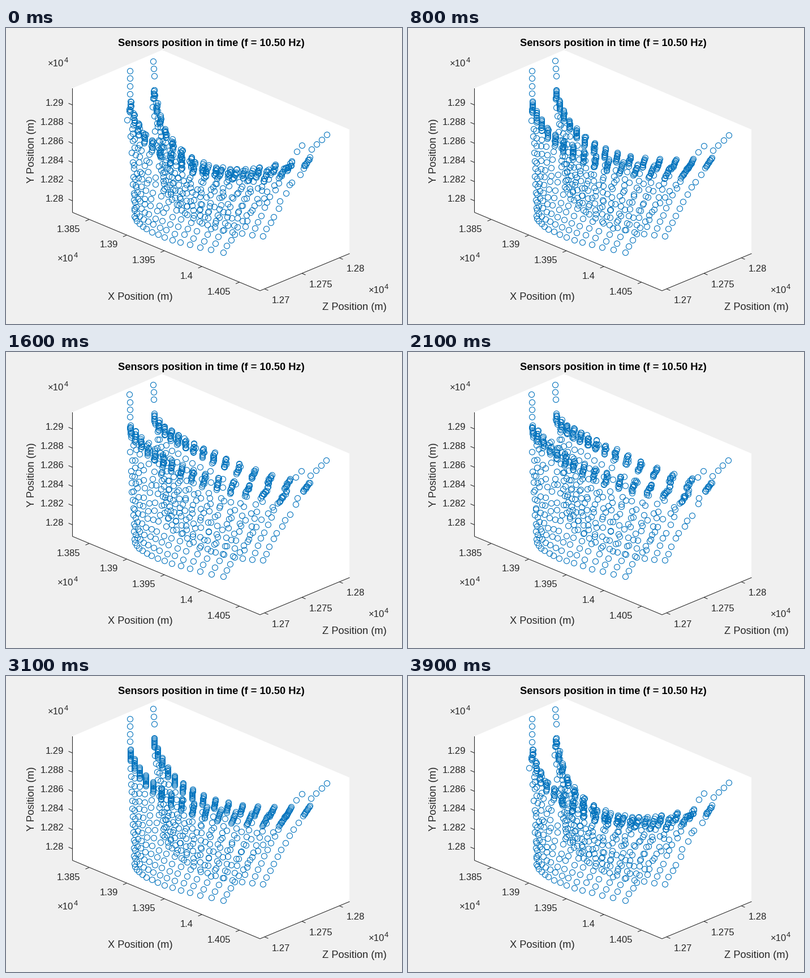
These frames come from a looping animation (700 px wide and 525 px high, 4000 ms). A matplotlib script:

```python
import numpy as np
import matplotlib.pyplot as plt
from matplotlib.animation import FuncAnimation

W, H, DPI = 700, 525, 100
PT = 72 / DPI
FRAMES = 40
COLS = 15
STEP = 14  # spacing of the sensors below the rim
BLUE, DARK = "#0072BD", "#262626"
TICK, LABEL = 16.65, 18.3

plt.rcParams["font.family"] = "Liberation Sans"
rng = np.random.default_rng(7)

fig = plt.figure(figsize=(W / DPI, H / DPI), dpi=DPI, facecolor="#f0f0f0")
ax = fig.add_axes([0, 0, 1, 1])
ax.set_xlim(0, W)
ax.set_ylim(H, 0)
ax.axis("off")


def label(x, y, text, size=TICK, ha="center", color=DARK, **kw):
    """Text whose capitals are centred on y."""
    ax.text(x, y + 0.36 * size, text, fontsize=size * PT, ha=ha,
            va="baseline", color=color, **kw)


def line(*pts):
    ax.plot(*zip(*pts), color=DARK, lw=0.75, solid_capstyle="butt")


def ticks(start, step, mark, offset, ha, first, gap, count):
    """Evenly spaced ticks and numbers along one axis."""
    for i in range(count):
        pos = np.add(start, np.multiply(step, i))
        line(pos, pos + mark)
        text = f"{first + gap * i:.3f}".rstrip("0")
        label(*(pos + offset), text, ha=ha)


def draw_axes():
    ax.fill(*zip((117, 107), (276, 39), (607, 180), (607, 400),
                 (449, 466), (117, 327)), color="white", lw=0)
    line((117.5, 107), (117.5, 327), (449, 466), (607.5, 400))
    ticks((117.5, 306.5), (0, -34), (-7, -3), (-15, -4.5), "right", 1.28, 0.002, 6)
    ticks((147, 339.6), (66.4, 27.8), (-6.5, 2.8), (-15.5, 16), "right", 1.385, 0.005, 5)
    ticks((457, 462.7), (66, -27.6), (6.5, 2.8), (13, 19), "left", 1.27, 0.005, 3)

    for x, y in ((74, 62), (91, 408), (640.5, 464)):
        label(x, y, "×10", ha="left")
        label(x + 28.5, y - 6, "4", 13, ha="left")

    label(363, 25, "Sensors position in time (f = 10.50 Hz)", LABEL,
          color="black", weight="bold")
    label(237.5, 475, "X Position (m)", LABEL)
    label(616, 493, "Z Position (m)", LABEL)
    ax.text(50, 217.5, "Y Position (m)", fontsize=LABEL * PT, rotation=90,
            rotation_mode="anchor", ha="center", va="baseline", color=DARK)


def arc(u, start, mid, end):
    """Parabola through three points, reached at u = 0, 0.5 and 1."""
    a, m, b = map(np.array, (start, mid, end))
    return a + (4 * m - 3 * a - b) * u + 2 * (a + b - 2 * m) * u * u


points = []  # rows of x, y, swing x, swing y, jitter x, jitter y


def add(pos, swing, jitter):
    points.append((*pos, *swing, *rng.normal(0, jitter, 2)))


def add_sheet(rim, foot, swing_x, swing_y, power, height, bow):
    """A sheet of columns: a dense group at the rim, then a sparse tail."""
    for u in np.linspace(0, 1, COLS):
        top, bottom = arc(u, *rim), arc(u, *foot)
        swing = np.array([-swing_x * np.sin(2 * np.pi * u),
                          swing_y * abs(np.sin(np.pi * u)) ** power])
        down = np.array([-0.68 * u ** 2.5, 1]) * height
        for d in np.linspace(-0.5, 0.5, 10):
            add(top + down * d, swing, 1.2)
        top = top + down / 2
        n = round(np.hypot(*(bottom - top)) / STEP)
        for s in np.arange(1, n + 1) / n:
            bend = np.array([-4 * bow * u * u * s * (1 - s), 0])
            add(top + (bottom - top) * s + bend,
                swing * (1 - s) ** 1.3, 0.5 + 2.5 * (1 - s))


def add_arm(start, end, count, swing):
    for pos in np.linspace(start, end, count):
        add(pos, swing, 0.15)


# rear and front sheet
add_sheet(rim=((262, 118), (348, 210), (531, 239)),
          foot=((280, 285), (343, 343.5), (454, 369)),
          swing_x=5, swing_y=38, power=1.2, height=17, bow=3)
add_sheet(rim=((220, 140), (310, 224), (489, 256)),
          foot=((227, 333), (268, 366), (384, 398)),
          swing_x=3, swing_y=16, power=0.6, height=20, bow=6)
# loose arms above the outer columns
add_arm((218.5, 75.5), (219, 116), 4, (0, 0.6))
add_arm((260, 58.3), (261.5, 84.5), 3, (0.2, 0.7))
add_arm((522.5, 209.5), (513, 220.5), 2, (0.7, -1.5))
add_arm((566.5, 190.5), (539, 217.5), 4, (0.8, -2))

X, Y, SX, SY, JX, JY = np.array(points).T
draw_axes()
dots, = ax.plot([], [], "o", ms=10 * PT, mfc="none", mec=BLUE, mew=0.8)


def update(n):
    phase = 2 * np.pi * n / (FRAMES - 1)
    swing, shake = np.cos(phase - 0.035), np.cos(phase - 0.12)
    dots.set_data(X + SX * swing + JX * shake, Y + SY * swing + JY * shake)
    return dots,


anim = FuncAnimation(fig, update, frames=FRAMES, interval=100, repeat=True,
                     repeat_delay=0, init_func=lambda: update(0))
plt.show()
```
